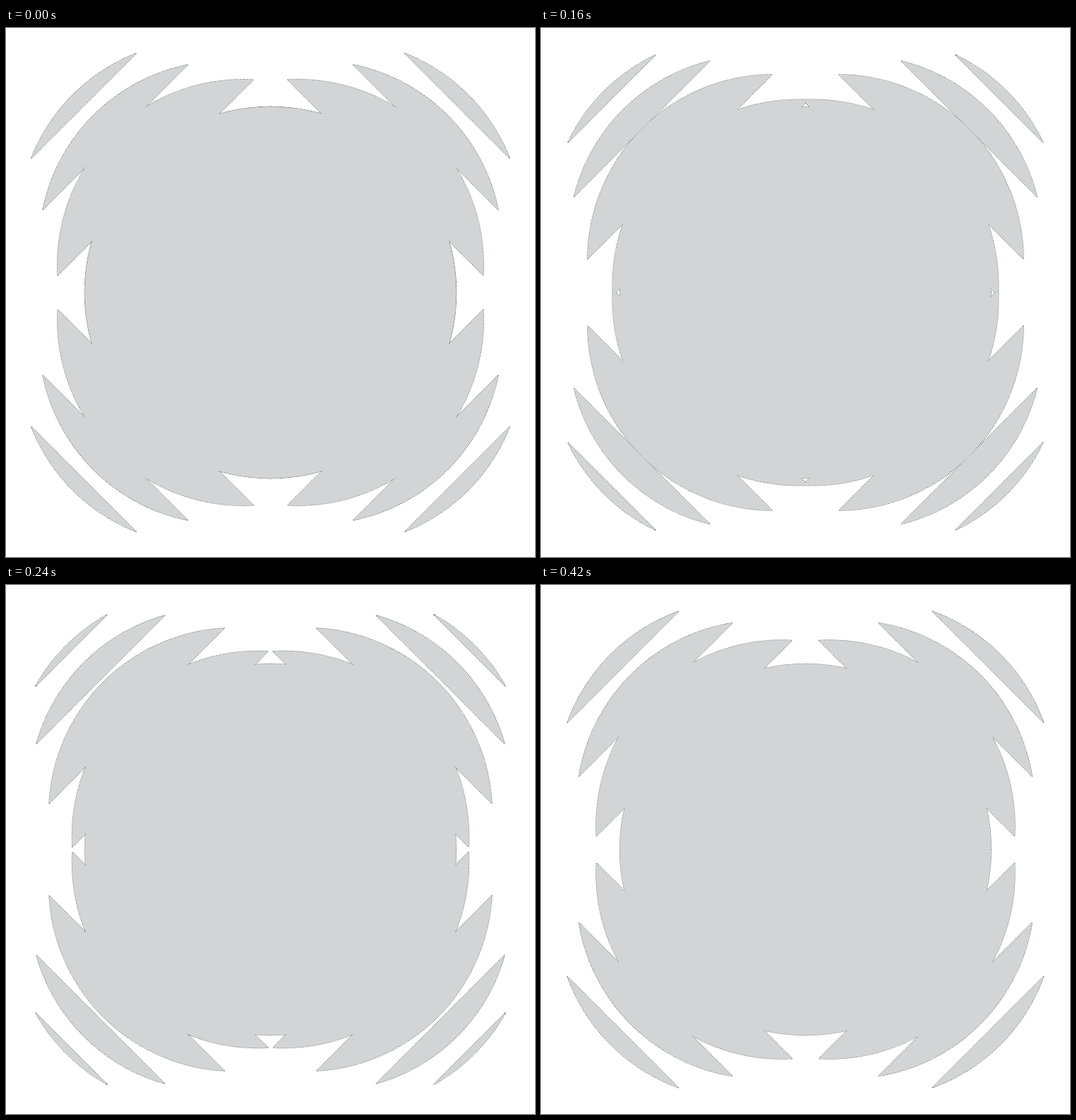
Recreate the animation shown at these times as an HTML page with a canvas. Size 748 by 748 pixels, loop 440 ms.

```html
<!DOCTYPE html>
<html lang="en">
<head>
<meta charset="utf-8">
<title>Expanding circle slices</title>
<style>
  html, body { margin: 0; width: 100%; height: 100%; overflow: hidden; background: #fff; }
  canvas { display: block; width: 748px; height: 748px; }
</style>
</head>
<body>
<canvas id="stage" width="748" height="748"></canvas>
<script>
const ctx = document.getElementById('stage').getContext('2d');
const MID = 374, R = 262.5, LOOP = 440, STEPS = 15;

// Per stage: how far a circle has moved out, and how far its cut lies from its own centre.
const shift = [0, 54.8, 91.65, 132.8, 160.4];
const cut = [175, 175, 218.75, 240.6, 266];

const mix = (list, i, p) => list[i] + (list[i + 1] - list[i]) * p;

function buildShapes(p) {
  const disk = new Path2D();
  disk.arc(MID, MID, R, 0, 2 * Math.PI);
  const shapes = [disk];
  for (let i = 0; i < 4; i++) {
    const c = mix(cut, i, p);
    if (c >= R) continue;
    const d = mix(shift, i, p), half = Math.acos(c / R);
    for (let q = 0; q < 4; q++) {
      const a = (q + 0.5) * Math.PI / 2;
      const slice = new Path2D();
      slice.arc(MID + d * Math.cos(a), MID + d * Math.sin(a), R, a - half, a + half);
      slice.closePath();
      shapes.push(slice);
    }
  }
  return shapes;
}

function draw(step) {
  const shapes = buildShapes(step / STEPS);
  ctx.fillStyle = '#fff';
  ctx.fillRect(0, 0, 748, 748);
  // Outlines go first so that the fills hide every inner line.
  ctx.strokeStyle = '#222';
  ctx.lineWidth = 1.3;
  ctx.lineJoin = 'bevel';
  ctx.setLineDash([1, 1.5]);
  shapes.forEach(s => ctx.stroke(s));
  ctx.fillStyle = '#d3d4d6';
  shapes.forEach(s => ctx.fill(s));
}

// 30 ms steps on a 20 ms clock; the first pose is held for 60 ms.
function stepAt(ms) {
  const tick = Math.floor((ms % LOOP) / 20);
  return Math.max(0, Math.floor(tick * 2 / 3) - 1);
}

let shown = -1;
function frame() {
  const step = stepAt(performance.now());
  if (step !== shown) draw(shown = step);
  requestAnimationFrame(frame);
}
frame();
</script>
</body>
</html>
```
